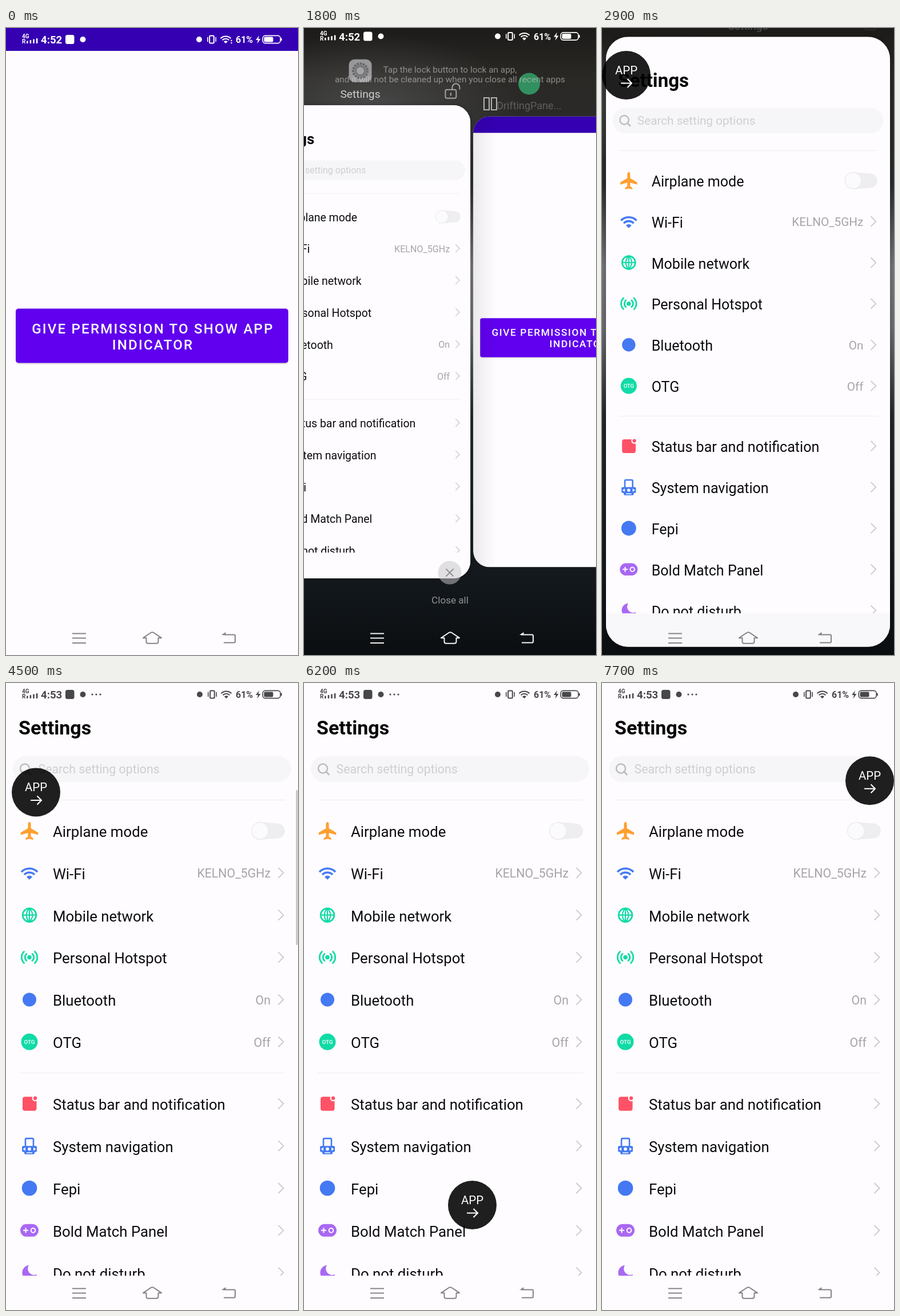
An HTML page that plays this animation: 511x1096 px, repeating every 8 s.

```html
<!DOCTYPE html>
<html lang="en">
<head>
<meta charset="utf-8">
<title>Floating app indicator</title>
<style>
html, body { margin: 0; width: 100%; height: 100%; overflow: hidden; background: #fefcfe; }
svg { display: block; width: 100%; height: 100%; font-family: Roboto, sans-serif; }
#settings { filter: drop-shadow(0 0 4px rgba(0, 0, 0, .3)); }
</style>
</head>
<body>
<svg id="stage" viewBox="0 0 511 1096" xmlns="http://www.w3.org/2000/svg"></svg>
<script>
const LOOP = 8000, STEP = 100, W = 511, H = 1096, PAPER = '#fefcfe';
const BLUE = '#4479f3', GREEN = '#10dba6', PURPLE = '#a968f3', RED = '#ff5266', ORANGE = '#ff9f30';
const stage = document.getElementById('stage');

const text = (x, y, size, fill, str, more = '') =>
  `<text x="${x}" y="${y}" font-size="${size}" fill="${fill}" ${more}>${str}</text>`;
const rect = (x, y, w, h, r, fill, more = '') =>
  `<rect x="${x}" y="${y}" width="${w}" height="${h}" rx="${r}" fill="${fill}" ${more}/>`;
const circle = (x, y, r, fill, more = '') => `<circle cx="${x}" cy="${y}" r="${r}" fill="${fill}" ${more}/>`;
const line = (d, color, w, more = '') =>
  `<path d="${d}" fill="none" stroke="${color}" stroke-width="${w}" ${more}/>`;
const shape = (d, fill) => `<path d="${d}" fill="${fill}"/>`;
const group = (id, body, more = '') => `<g id="${id}" ${more}>${body}</g>`;
const MID = 'text-anchor="middle"', END = 'text-anchor="end"', BOLD = 'font-weight="700"';
const ROUND = 'stroke-linecap="round" stroke-linejoin="round"';

// Fan of arcs over a small wedge
function wifi(x, y, radii, w, wedge, color) {
  const fan = r => `M${x - r * .72} ${y - r * .7}A${r} ${r} 0 0 1 ${x + r * .72} ${y - r * .7}`;
  return radii.map(r => line(fan(r), color, w)).join('') + shape(fan(wedge) + `L${x} ${y}z`, color);
}

function appScreen() {
  const label = (y, str) => text(257, y, 24.15, '#fff', str, `${MID} font-weight="500" letter-spacing="2.157"`);
  return rect(0, 0, W, H, 0, PAPER) + rect(0, 0, W, 40, 0, '#3500b1') +
    rect(17, 492, 477, 96, 5, '#000', 'opacity=".1"') + rect(17, 490.5, 477, 95, 5, '#6000ee') +
    label(533.5, 'GIVE PERMISSION TO SHOW APP') + label(561.8, 'INDICATOR');
}

// Row icons, drawn around (0, 0)
const icons = {
  plane: shape('M0-15q2.6 0 2.6 5v6l12.6 7.5v4L2.6 4v6.5l4 3V16L0 14.5-6.6 16v-2.5l4-3V4l-12.6 3.5v-4L-2.6-4v-6q0-5 2.6-5z', ORANGE),
  wifi: wifi(0, 12, [19.5, 12.5], 3.6, 7, BLUE),
  globe: circle(0, 0, 11.8, 'none', `stroke="${GREEN}" stroke-width="2.8"`) +
    line('M-12 0H12M0-12V12M0-12C-7-5-7 5 0 12M0-12C7-5 7 5 0 12', GREEN, 2.2),
  hotspot: circle(0, 0, 3.8, GREEN) +
    line('M-5-6A8 8 0 0 0-5 6M5-6A8 8 0 0 1 5 6M-9.5-10A14 14 0 0 0-9.5 10M9.5-10A14 14 0 0 1 9.5 10', GREEN, 2.8, ROUND),
  radio: circle(0, 0, 12, BLUE),
  otg: circle(0, 0, 14.5, GREEN) + text(0, 3.6, 9.8, '#fff', 'OTG', MID + ' font-weight="500"'),
  notice: rect(-12, -12, 24.5, 24.5, 4, RED) + circle(10, -9.5, 5.4, PAPER) + circle(10, -9.5, 3.2, RED),
  nav: rect(-7, -13, 14, 18, 2, 'none', `stroke="${BLUE}" stroke-width="2.6"`) +
    rect(-13, 0, 26, 10.5, 2, BLUE) + rect(-9, 8, 18, 6.5, 2, BLUE) +
    shape('M-7 2.5v6l-4.5-3zM7 2.5v6l4.5-3z', '#fff') + circle(0, 5.5, 2.8, '#fff') +
    line('M-5 12H5', '#fff', 1.5),
  helper: circle(0, 0, 13.3, BLUE),
  pad: rect(-16, -11, 32, 22, 11, PURPLE) + line('M-11 0h9M-6.5-4.5v9', '#fff', 2) +
    circle(6.5, 0, 3.8, 'none', 'stroke="#fff" stroke-width="2"'),
  moon: shape('M-1-13A13 13 0 1 0 13 3A11 11 0 0 1-1-13z', PURPLE)
};

const rows = [
  ['plane', 'Airplane mode'], ['wifi', 'Wi-Fi', 'KELNO_5GHz'], ['globe', 'Mobile network'],
  ['hotspot', 'Personal Hotspot'], ['radio', 'Bluetooth', 'On'], ['otg', 'OTG', 'Off'],
  ['notice', 'Status bar and notification'], ['nav', 'System navigation'],
  ['helper', 'Fepi'], ['pad', 'Bold Match Panel'], ['moon', 'Do not disturb']
];
// Even pitch, with a wider gap before the second section
const rowY = i => 259 + 73.85 * i + (i > 5 ? 34.2 : 0);

function settingsScreen() {
  const list = rows.map(([icon, name, value], i) => {
    const y = rowY(i);
    return `<g transform="translate(41 ${y - 1})">${icons[icon]}</g>` +
      text(82, y + 9.8, 25.77, '#0c0b0d', name) +
      (value ? text(463, y + 7.5, 21.3, '#a6a4a8', value, END) : '') +
      (i ? line(`M476.5 ${y - 10}l9 9-9 9`, '#c9c8cc', 1.8) : '');
  }).join('');
  return rect(0, 0, W, H, 0, PAPER) +
    text(22, 90, 34, '#050505', 'Settings', BOLD) +
    rect(12, 128, 487, 45, 22.5, '#f6f5f8') +
    circle(33, 149.5, 8, 'none', 'stroke="#bcbbbf" stroke-width="2.5"') +
    line('M38.5 155l5 5', '#bcbbbf', 2.8, ROUND) +
    text(56.5, 158.3, 21.3, '#cfced2', 'Search setting options') +
    line('M24 204.5H488M24 681.5H488', '#f1f0f3', 1.4) +
    `<g clip-path="url(#list)">${list}</g>` +
    shape('M444 243L475 245.5a13 13 0 0 1 0 26L444 274z', '#eeedf0') +
    circle(444.5, 258.5, 14.8, '#fbfafc', 'stroke="#e9e8eb" stroke-width="1.2"') +
    rect(507.5, 187, 3, 271, 1.5, '#c3c2c5', 'id="scroll"') +
    rect(0, 1036, W, 60, 0, '#f8f7f9', 'id="navBack"');
}

function recentsUi() {
  const gear = circle(0, 0, 12, 'none', 'stroke="#77777c" stroke-width="5" stroke-dasharray="3.5 1.53"') +
    circle(0, 0, 11, '#9a9a9f') + circle(0, 0, 7.5, '#c9c9cd', 'stroke="#808085" stroke-width="1.5"');
  const lock = rect(-13, -5, 19, 15, 3, 'none', 'stroke="#c9c9c9" stroke-width="2"') +
    line('M-1-5V-9a6.5 6.5 0 0 1 13 0v3M-3.5 1v4', '#c9c9c9', 2, ROUND);
  const split = line('M-11-10.5h9v21h-9zM2-10.5h9v21H2z', '#cfcfcf', 2);
  return group('appIcon', circle(0, 0, 19, '#35a56b')) +
    group('appName', text(0, 6, 18, '#fff', 'DriftingPane...', MID)) +
    group('split', split) +
    group('setTitle', rect(-20, -61, 40, 40, 10, '#bdbdc1') +
      `<g transform="translate(0 -41)">${gear}</g>` + text(0, 6.5, 19.2, '#fff', 'Settings', MID)) +
    group('lock', lock) +
    group('hint', text(255.5, 77.5, 15.4, '#d2d0ce', 'Tap the lock button to lock an app,', MID) +
      text(255.5, 95, 15.4, '#d2d0ce', 'and it will not be cleaned up when you close all recent apps', MID) +
      circle(255, 952, 20.5, '#c6c5c8', 'opacity=".9"') +
      line('M248.5 945.5l13 13m0-13l-13 13', '#444', 1.8) +
      text(255.5, 1006, 17.1, '#eceded', 'Close all', MID));
}

function statusBar() {
  const c = 'currentColor';
  const bars = [0, 1, 2, 3].map(i => rect(36 + i * 5.6, 22.5 - i * 1.5, 2.6, 4.5 + i * 1.5, .8, c)).join('');
  return text(28, 18, 10, c, '4G', BOLD) + text(28, 27, 10, c, 'R', BOLD) + bars +
    text(61, 27, 18.6, c, '4:52', BOLD + ' id="clock"') +
    rect(104, 12, 15.5, 16, 3.5, c) + circle(134.5, 20, 5, c) +
    group('more', [151, 158, 165].map(x => circle(x, 20, 1.6, c)).join('')) +
    group('radios', circle(339, 20, 5, c) +
      rect(357.2, 13.5, 7.6, 13, 1.5, 'none', `stroke="${c}" stroke-width="2"`) +
      line('M353.8 16v8M368.2 16v8', c, 1.6) +
      wifi(385.5, 27, [12.5, 8.2], 2, 4.8, c)) +
    group('traffic', circle(394.5, 22, 1.2, c) + circle(394.5, 26, 1.2, c)) +
    text(402, 26.2, 16, c, '61%', BOLD) +
    shape('M443 13l-6 8h4l-1.5 6.5 6-8.5h-4z', c) +
    rect(449.2, 13.4, 31, 13.2, 4.5, 'none', `stroke="${c}" stroke-width="1.6"`) +
    rect(451.5, 15.6, 16, 8.8, 2, c) + rect(481, 17.5, 1.8, 5, .9, c);
}

const navBar = line('M116 1058.5h24M116 1066.5h24M116 1075h24' +
  'M240 1066.2L253.5 1057q2.5-1.4 5 0L272 1066.2h-5.5v6.3q0 3.2-3.2 3.2h-14.600q-3.2 0-3.2-3.2v-6.3z' +
  'M380 1060.5h19q2 0 2 2v10q0 2-2 2h-18', 'currentColor', 2, 'stroke-linejoin="round"') +
  shape('M377 1061l7.5-5v5z', 'currentColor');

const dot = circle(0, 0, 42.5, '#000', 'opacity=".88"') + text(0, -2, 20.4, '#fff', 'APP', MID) +
  line('M-9.5 14H9.5M2 6.5L9.5 14 2 21.5', '#fff', 2.1);

const wall = [[0, '#1c1b19'], [.08, '#2a2825'], [.25, '#2b2c2e'], [.38, '#737478'], [.48, '#686a6f'],
  [.62, '#22272b'], [.87, '#14191d'], [1, '#0a0e11']];

stage.innerHTML = `<defs>
  <linearGradient id="wall" x2="0" y2="1">${wall.map(([o, c]) => `<stop offset="${o}" stop-color="${c}"/>`).join('')}</linearGradient>
  <linearGradient id="shade"><stop stop-opacity=".13"/><stop offset="1" stop-opacity="0"/></linearGradient>
  <radialGradient id="glow"><stop stop-color="#8a8f92" stop-opacity=".3"/><stop offset="1" stop-color="#8a8f92" stop-opacity="0"/></radialGradient>
  <clipPath id="card">${rect(0, 0, W, H, 0, '#000', 'id="corner"')}</clipPath>
  <clipPath id="list">${rect(0, 0, W, 1036, 0, '#000')}</clipPath></defs>` +
  rect(0, 0, W, H, 0, 'url(#wall)') +
  '<ellipse cx="120" cy="130" rx="260" ry="120" fill="url(#glow)"/>' +
  group('app', `<g clip-path="url(#card)">${appScreen()}${rect(0, 0, 55, H, 0, 'url(#shade)', 'id="edge"')}</g>`) +
  group('settings', `<g clip-path="url(#card)">${settingsScreen()}</g>`) +
  group('recents', recentsUi()) + group('status', statusBar()) + group('nav', navBar) + group('dot', dot);

const el = id => document.getElementById(id);
const show = (id, opacity) => {
  el(id).style.display = opacity > 0 ? '' : 'none';
  el(id).setAttribute('opacity', opacity);
};
const move = (id, x, y) => el(id).setAttribute('transform', `translate(${x} ${y})`);
const mix = (a, b, k) => a + (b - a) * k;

// Linear track through [time, value, ...] points
function track(keys, t, n = 1) {
  if (t <= keys[0][0]) return keys[0][n];
  for (let i = 1; i < keys.length; i++) {
    const a = keys[i - 1], b = keys[i];
    if (t <= b[0]) return mix(a[n], b[n], (t - a[0]) / (b[0] - a[0]));
  }
  return keys[keys.length - 1][n];
}

const enter = [[1600, 0], [1700, .2], [1800, .59], [1900, .88], [2000, 1]];
const launch = [[2600, 0], [2700, .25], [2800, .65], [2900, .91], [3000, 1]];
const drag = [[4400, 42.5, 82.5], [4500, 52.5, 191], [4700, 57, 390], [4900, 54, 555], [5000, 51, 605], [5100, 50, 626],
  [5700, 50, 626], [5800, 72, 650], [6000, 185, 785], [6200, 294.5, 912.5], [6400, 375, 975], [6600, 406, 988],
  [6700, 410, 968], [7000, 441, 740], [7300, 467, 462.7], [7500, 468, 263], [7600, 468.5, 205], [7700, 468.5, 170.8]];

// Places a shrunken screen by its centre and returns its box
function place(id, cx, scale) {
  const x = cx - W * scale / 2, y = 548.5 - H * scale / 2;
  el(id).setAttribute('transform', `translate(${x} ${y}) scale(${scale})`);
  return { x, y, right: x + W * scale };
}

function render(time) {
  const t = Math.floor(time / STEP) * STEP;
  const p = track(enter, t), o = track(launch, t);
  const cards = p > 0 && o < 1;

  show('app', o < 1 ? 1 : 0);
  show('settings', p > 0 ? 1 : 0);
  show('recents', cards ? 1 : 0);
  show('edge', p);
  el('corner').setAttribute('rx', cards ? 40 : 0);
  el('settings').style.filter = cards ? '' : 'none';

  if (cards) {
    const a = place('app', 255.5 + 380 * p + 160 * o, 1 - .3 * (1 - Math.pow(1 - p, 3.1)));
    const s = place('settings', mix(-127.4, 255.5, p), mix(.834, .7, p) + .3 * o);
    const fade = 1 - o;
    move('appIcon', a.x + 98, a.y - 57);
    move('appName', a.x + 98, a.y - 19);
    move('split', a.x + 30, a.y - 22);
    move('setTitle', (s.x + s.right) / 2, s.y - 19);
    move('lock', s.right - 31, s.y - 22);
    show('appIcon', Math.min(1, p * 1.4) * fade);
    show('appName', Math.max(0, (p - .45) * 1.7) * fade);
    show('split', Math.min(1, p * 1.4) * fade);
    show('setTitle', (.36 + .64 * p) * (1 - .85 * o));
    show('lock', (.36 + .64 * p) * fade);
    show('hint', p * Math.max(0, 1 - 1.3 * o));
  } else {
    el(o < 1 ? 'app' : 'settings').removeAttribute('transform');
  }

  show('navBack', cards && o > 0 ? 1 : 0);
  show('scroll', track([[3000, 0], [3200, 1], [4500, 1], [4800, 0]], t));

  const busy = t < 600 || (t >= 3200 && t < 3600) || (t >= 6900 && t < 7600);
  show('traffic', busy ? 1 : 0);
  move('radios', busy ? -1 : 0, 0);
  show('more', t >= 3100 ? 1 : 0);
  show('status', t >= 2800 && t < 3100 ? 0 : 1);
  move('status', 0, cards ? -5.5 : 0);
  el('status').setAttribute('color', t < 3100 ? '#fff' : '#48474a');
  el('clock').textContent = t < 3900 ? '4:52' : '4:53';
  el('nav').setAttribute('color', cards && o < .5 ? '#f4f4f4' : '#858387');

  show('dot', t >= 2800 ? 1 : 0);
  move('dot', track(drag, t), track(drag, t, 2));
}

const start = performance.now();
function tick() {
  render((performance.now() - start) % LOOP);
  requestAnimationFrame(tick);
}
tick();
</script>
</body>
</html>
```
